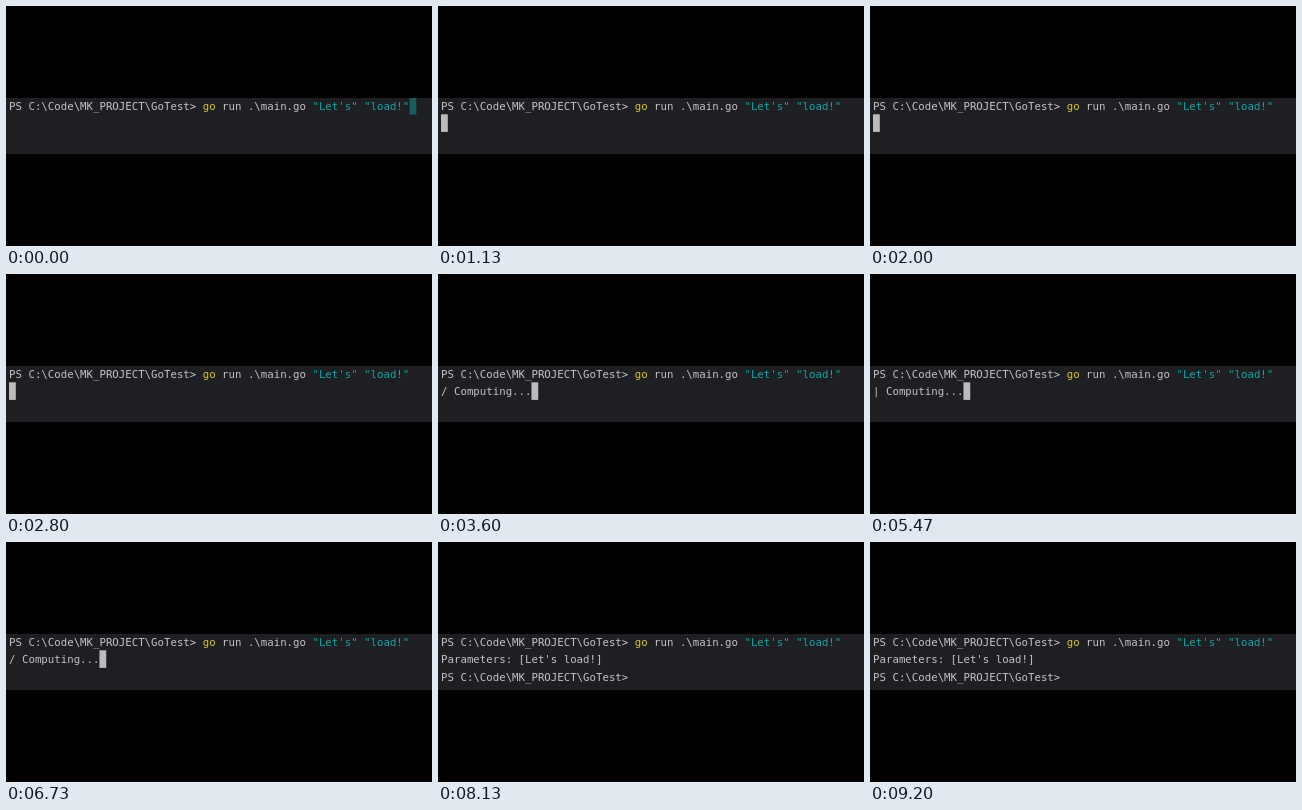
Recreate the animation shown at these times as an HTML page. Size 426 by 240 pixels, loop 9.27 s.

```html
<!DOCTYPE html>
<html lang="en">
<head>
<meta charset="utf-8">
<title>Terminal spinner</title>
<style>
  html, body { margin: 0; width: 100%; height: 100%; overflow: hidden; background: #000; }
  svg { display: block; }
  text { font: 10.73px "DejaVu Sans Mono", monospace; fill: #c4c5ca; white-space: pre; }
  .cmd { fill: #d9c526; }
  .str { fill: #16a3a3; }
</style>
</head>
<body>
<svg width="426" height="240">
  <svg y="92" width="426" height="56">
    <rect width="426" height="56" fill="#1e1f22"/>
    <rect id="cursor" width="6.8" height="17.6"/>
    <text x="3.1" y="12">PS C:\Code\MK_PROJECT\GoTest&gt; <tspan class="cmd">go</tspan> run .\main.go <tspan class="str">"Let's" "load!"</tspan></text>
    <text id="output" x="3.1" y="29.3"></text>
    <text id="prompt" x="3.1" y="46.6"></text>
  </svg>
</svg>
<script>
  const LOOP = 9270, ENTER = 870, START = 3015, DONE = 6930, PROMPT = 7130;
  const TICK = 100, CHAR = 6.46, LINE = 17.3;
  const [cursor, output, prompt] = ["cursor", "output", "prompt"].map(id => document.getElementById(id));

  function setText(el, text) {
    if (el.textContent !== text) el.textContent = text;
  }

  function showCursor(column, row, color) {
    cursor.setAttribute("x", 3 + column * CHAR);
    cursor.setAttribute("y", row * LINE - 1);
    cursor.setAttribute("fill", color);
  }

  function draw() {
    const t = performance.now() % LOOP;
    let line = "";
    if (t >= DONE) line = "Parameters: [Let's load!]";
    else if (t >= START) line = "|/-\\"[Math.floor((t - START) / TICK) % 4] + " Computing...";

    setText(output, line);
    setText(prompt, t >= PROMPT ? "PS C:\\Code\\MK_PROJECT\\GoTest>" : "");

    if (t < ENTER) showCursor(62, 0, "#1a5c5e");
    else if (t < DONE) showCursor(line.length, 1, "#bcbcbc");
    else showCursor(0, 2, t < PROMPT ? "#bcbcbc" : "none");

    requestAnimationFrame(draw);
  }
  draw();
</script>
</body>
</html>
```
